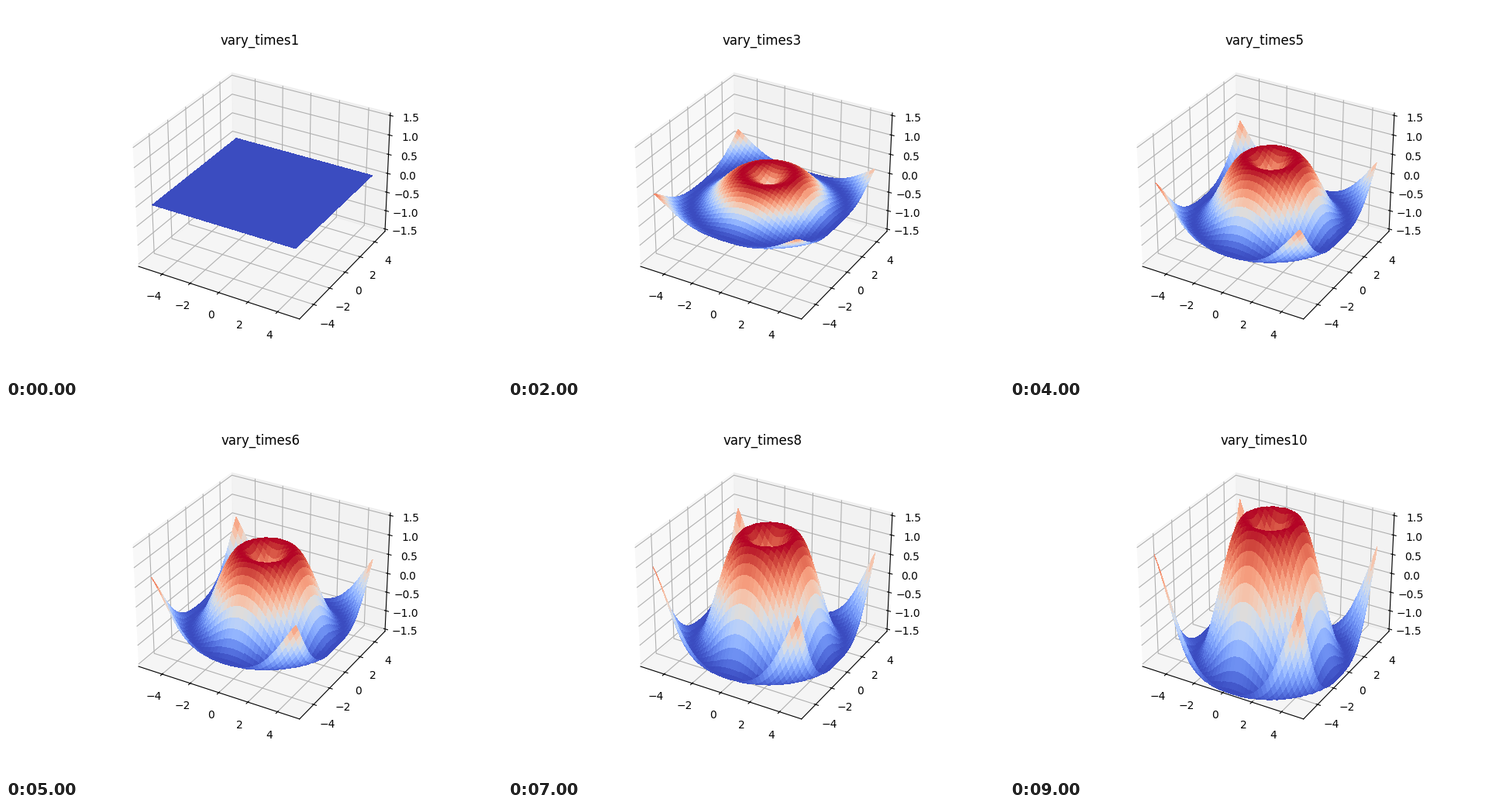
These frames come from a looping animation (640x480 px, 10 s). A matplotlib script:

```python
import numpy as np
import matplotlib.pyplot as plt
from matplotlib.animation import FuncAnimation

FRAMES = 10
INTERVAL = 1000
STEP = 0.2              # height gained per frame
VIEW_PAD = 1 / 48       # space between the limits and the panes

axis = np.arange(-5, 5, 0.25)
X, Y = np.meshgrid(axis, axis)
RIPPLE = np.sin(np.hypot(X, Y))


def padded(low, high, share):
    pad = (high - low) * share
    return low - pad, high + pad


fig = plt.figure(figsize=(6.4, 4.8), dpi=100)
ax = fig.add_subplot(111, projection="3d")

side = padded(*padded(axis[0], axis[-1], 0.05), VIEW_PAD)
ax.set(
    xlim=side,
    ylim=side,
    zlim=padded(-1.5, 1.5, VIEW_PAD),
    xticks=range(-4, 5, 2),
    yticks=range(-4, 5, 2),
    zticks=np.arange(-1.5, 1.6, 0.5),
)


def draw(i):
    for old in list(ax.collections):
        old.remove()
    surface = ax.plot_surface(
        X, Y, STEP * i * RIPPLE,
        cmap="coolwarm", linewidth=0, antialiased=False,
    )
    title = ax.set_title(f"vary_times{i + 1}")
    return surface, title


anim = FuncAnimation(
    fig, draw, frames=FRAMES, init_func=lambda: draw(0),
    interval=INTERVAL, repeat=True, repeat_delay=0, blit=False,
)
plt.show()
```
